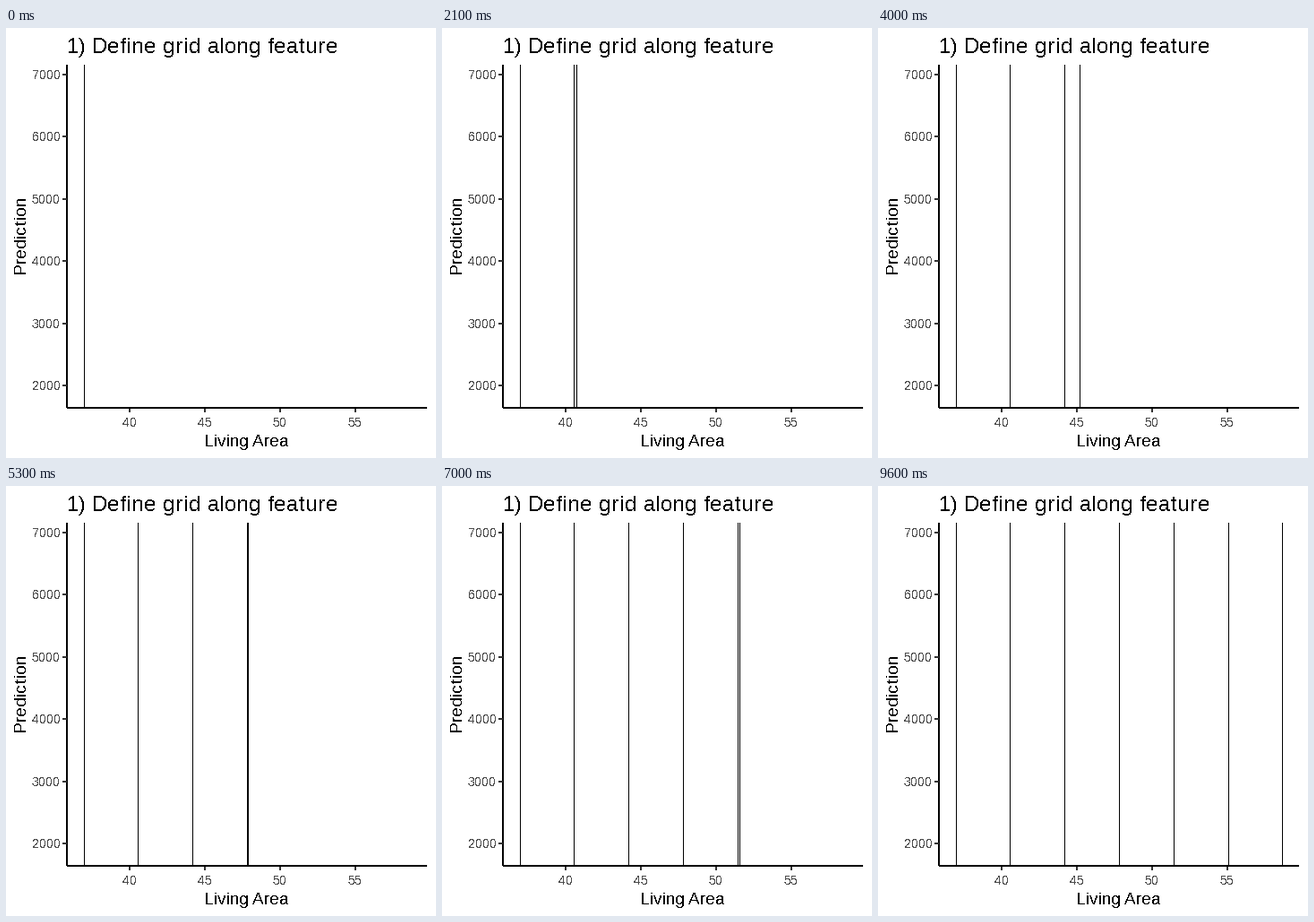
A matplotlib script for the animation above (10000 ms loop, 480 by 480 pixels).

```python
import matplotlib
import matplotlib.pyplot as plt
from matplotlib.animation import FuncAnimation
from matplotlib.patches import Rectangle

SIZE, DPI = 480, 100
FRAMES, INTERVAL = 100, 100
TOP, BOTTOM = 41, 423           # panel rows
FIRST_X, STEP, COUNT = 87.22, 60.76, 7
CENTER, PERIOD, LENGTH = 8.42, 16.4, 13.7   # timing of the moves, in frames

# Whole-pixel stems and advances, like a bitmap font
matplotlib.rcParams.update({
    "font.family": "Liberation Sans",
    "text.hinting": "force_autohint",
    "text.hinting_factor": 1,
    "text.antialiased": False,
})

fig = plt.figure(figsize=(SIZE / DPI, SIZE / DPI), dpi=DPI, facecolor="white")
ax = fig.add_axes([0, 0, 1, 1])
ax.set_xlim(0, SIZE)
ax.set_ylim(SIZE, 0)
ax.axis("off")


def bar(x, y, w, h, color="black"):
    return ax.add_patch(Rectangle((x, y), w, h, facecolor=color,
                                  linewidth=0, antialiased=False))


def label(x, y, text, px, color="black", **kw):
    kw = {"ha": "center", "va": "baseline", **kw}
    ax.text(x, y, text, fontsize=px * 72 / DPI, color=color, **kw)


def ease(t):
    """Cubic in and out, held at both ends."""
    t = min(max(t, 0), 1)
    return 4 * t ** 3 if t < 0.5 else 1 - 4 * (1 - t) ** 3


# Axes, ticks and titles
bar(67, TOP, 2, BOTTOM + 1 - TOP)
bar(68, BOTTOM, 402, 2)
for i in range(6):
    y = int(399.5 - 69.45 * i)
    bar(63, y - 1, 5, 2, "#333333")
    label(61, y + 5, str(2000 + 1000 * i), 14, "#4d4d4d", ha="right")
for i in range(4):
    x = 138 + 84 * i
    bar(x - 1, 425, 2, 4, "#333333")
    label(x, 445, str(40 + 5 * i), 14, "#4d4d4d")
label(68, 28, "1) Define grid along feature", 24, ha="left")
label(268, 467, "Living Area", 19)
label(25, 230, "Prediction", 19, rotation=90, ha="right", va="center")

lines = [bar(0, TOP, 1, BOTTOM - TOP) for _ in range(COUNT)]


def update(frame):
    lines[0].set_x(int(FIRST_X))
    for i, line in enumerate(lines[1:]):
        # Each line slides out of the one before it
        start = CENTER + PERIOD * i - LENGTH / 2
        p = ease((frame - start) / LENGTH)
        line.set_x(int(FIRST_X + STEP * (i + p)))
        line.set_visible(p > 0)
    return lines


anim = FuncAnimation(fig, update, frames=FRAMES, interval=INTERVAL,
                     repeat=True, repeat_delay=0, blit=False)
plt.show()
```
